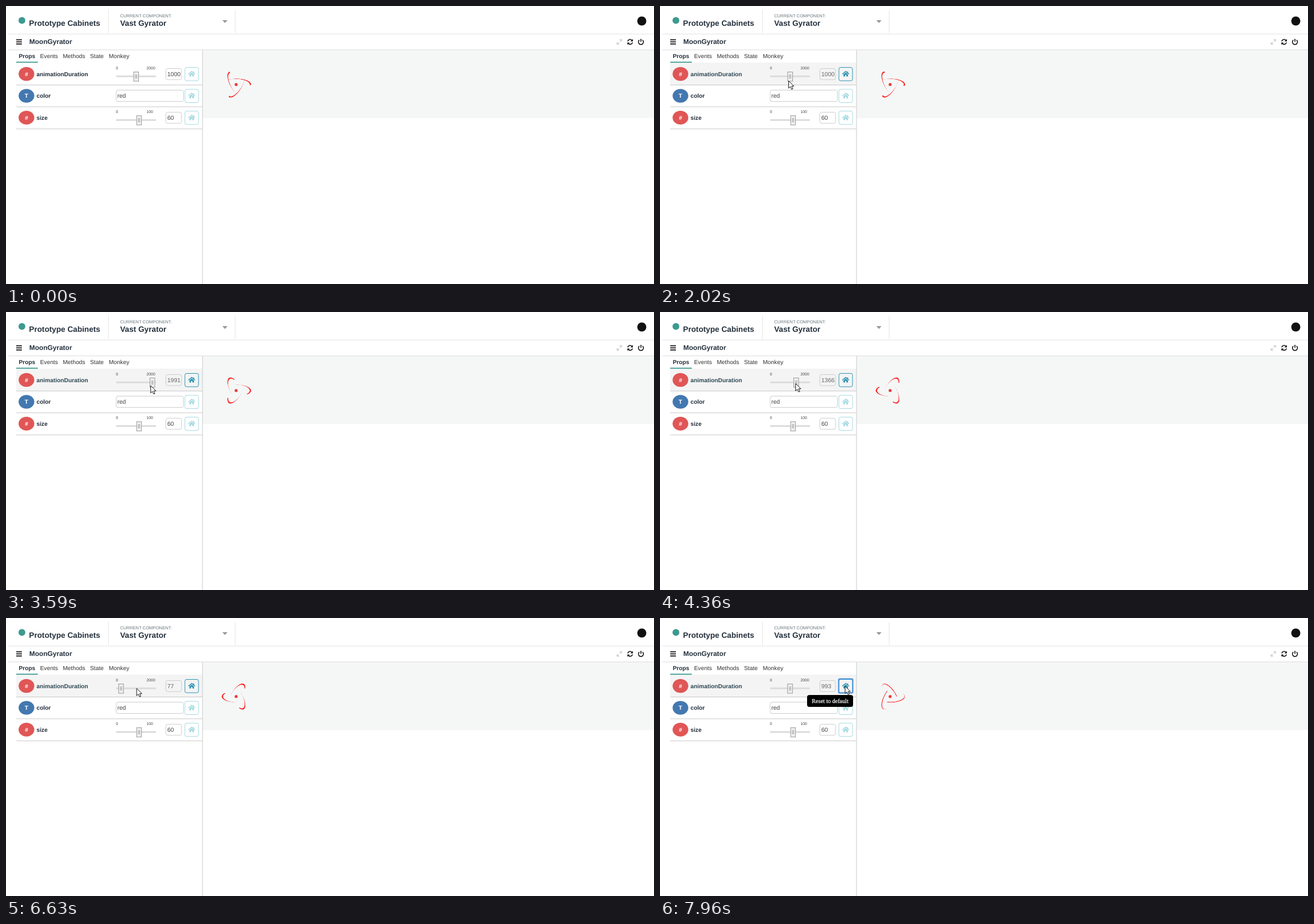
An HTML page for the animation above (8 s loop, 1141 by 491 pixels).

```html
<!DOCTYPE html>
<html lang="en">
<head>
<meta charset="utf-8">
<title>Component props panel</title>
<style>
  html, body { margin: 0; width: 100%; height: 100%; overflow: hidden; background: #fff; }
  svg { position: absolute; left: 0; top: 0; width: 1141px; height: 491px; }
  text { font-family: "Liberation Sans", Arial, sans-serif; font-size: 10.3px; fill: #333; text-rendering: geometricPrecision; white-space: pre; }
  .b { font-weight: 700; fill: #24303c; }
  .big { font-size: 13.7px; }
  .tiny { font-size: 6.9px; fill: #444; }
  .mark { font-weight: 700; fill: #fff; text-anchor: middle; }
  .field { font-size: 10.5px; fill: #444; }
  .back { fill: none; }
  .box { fill: #fff; stroke: #ccc; }
  .home { color: #a3d9e1; }
  .home rect { fill: #fff; stroke: currentColor; }
  .hover .home { color: #2b94b3; }
  .hover .back, .hover .box, .hover .home rect { fill: #f4f4f4; }
  .hover .b { fill: #2f4a55; }
  .hover .field { fill: #666; }
  #atom { position: absolute; left: 379.8px; top: 112.6px; width: 51.4px; height: 51.4px; }
  #atom div {
    position: absolute; box-sizing: border-box; width: 100%; height: 100%; border-radius: 50%;
    border-left: 2.06px solid #f00; border-top: 2.06px solid transparent;
  }
</style>
</head>
<body>
<svg viewBox="0 0 1141 491">
  <defs>
    <g id="house">
      <path d="M-4 .9L0 -2.4L4 .9V4.6H1.2V1.7H-1.2V4.6H-4ZM2.7 -4.4H4.2V-1H2.7Z" fill="currentColor"/>
      <path d="M-5.8 .4L0 -4.5L5.8 .4" fill="none" stroke="currentColor" stroke-width="1.5"/>
    </g>
    <g id="thumb">
      <rect x="-4.3" y="-8" width="8.6" height="16.4" fill="#efefef" stroke="#999"/>
      <path d="M-2 -2.5H2M-2 0H2M-2 2.5H2" stroke="#888"/>
    </g>
  </defs>

  <circle cx="28" cy="25.5" r="6" fill="#3c9a90"/>
  <text class="b big" x="40.5" y="35">Prototype Cabinets</text>
  <text x="201" y="19.6" style="font-size:7.7px;fill:#69767c">CURRENT COMPONENT:</text>
  <text class="b big" x="201" y="35">Vast Gyrator</text>
  <path d="M381 25H390L385.5 30Z" fill="#999"/>
  <path d="M180.5 6V48M403.5 8V48M4 49.5H1141" stroke="#e4e4e4"/>
  <circle cx="1119.5" cy="26.5" r="8" fill="#111"/>

  <path d="M18 59.7H28M18 63.4H28M18 67.1H28" stroke="#111" stroke-width="1.8"/>
  <text class="b" x="41" y="67.4" style="font-size:12px">MoonGyrator</text>
  <g fill="none" stroke="#111" stroke-width="1.6">
    <path d="M1076.5 67L1079.3 64.2M1080.8 62.6L1083.6 59.8M1076 64V67.5H1079.5M1080.5 59.3H1084V62.8" stroke="#ccc" stroke-width="1.3"/>
    <path d="M1094.7 62.4A4.3 4.3 0 0 1 1102 60.4M1103.2 64.4A4.3 4.3 0 0 1 1096 66.4"/>
    <path d="M1103.8 58.2V62.4H1099.6ZM1094.1 68.6V64.4H1098.3Z" fill="#111" stroke="none"/>
    <path d="M1115.3 60.2A4.4 4.4 0 1 0 1120.7 60.2M1118 58V63.3"/>
  </g>

  <rect x="346" y="78" width="795" height="120" fill="#f5f7f7"/>
  <path d="M4 77.5H1141" stroke="#ddd"/>
  <g id="rows"></g>
  <path d="M18 139.5H346M18 178H346M18 217H346M346 78V491" stroke="#c8c8c8"/>
  <g id="tabs"></g>
  <rect x="18" y="98.4" width="38" height="1.8" fill="#3c9a90"/>
</svg>

<div id="atom"><div></div><div></div><div></div></div>

<svg viewBox="0 0 1141 491">
  <circle cx="405.2" cy="138.7" r="2.6" fill="#ee3a3a"/>
  <rect id="focus" x="314.5" y="107.5" width="25" height="25" rx="2" fill="none" stroke="#4d93dc" stroke-width="2"/>
  <g id="tip">
    <rect x="259" y="136" width="81" height="21" rx="4" fill="#000"/>
    <text x="299.5" y="150.2" text-anchor="middle" style="font-family:'Liberation Serif',Times,serif;fill:#fff;stroke:#fff;stroke-width:.25">Reset to default</text>
  </g>
  <path id="cursor" d="M.5 .5V13.4L3.5 10.6L5.7 15.4L7.9 14.4L5.8 9.8H9.8Z" fill="#fff" stroke="#111"/>
</svg>

<script>
const $ = id => document.getElementById(id);
const LOOP = 8000, START = 70, STEP = 78.1;   // the picture advances in even steps
const GRAB = 2470, RELEASE = 7120, LAG = 130; // the thumb trails the dragging pointer

// ---- static panel ----
const tabs = { Props: 22.4, Events: 60, Methods: 100, State: 148, Monkey: 181 };
$('tabs').innerHTML = Object.entries(tabs).map(([name, x], i) =>
  `<text class="${i ? '' : 'b'}" x="${x}" y="91.8">${name}</text>`).join('');

const slider = (max, thumbX, value, id) => `
  <text class="tiny" x="193.6" y="-8.4">0</text>
  <text class="tiny" x="247.4" y="-8.4">${max}</text>
  <rect x="194" y="2.7" width="70" height="3" fill="#dcdcdc"/>
  <use id="${id}Thumb" href="#thumb" x="${thumbX}" y="4.5"/>
  <rect class="box" x="281.5" y="-9.5" width="27.5" height="19.5" rx="3"/>
  <text id="${id}Value" class="field" x="284" y="3.8">${value}</text>`;

const textBox = value => `
  <rect class="box" x="194" y="-10" width="118.5" height="20" rx="3"/>
  <text class="field" x="196" y="3.8">${value}</text>`;

const row = (name, i, mark, color, control) => `
  <g id="${name}" transform="translate(0 ${120 + 38.6 * i})">
    <rect class="back" x="18" y="-20" width="328" height="39"/>
    <ellipse cx="36" cy="0" rx="13.8" ry="12.2" fill="${color}"/>
    <text class="mark" x="36" y="3.7">${mark}</text>
    <text class="b" x="53.7" y="3.7">${name}</text>
    ${control}
    <g class="home">
      <rect x="315" y="-11.5" width="24" height="23.5" rx="3"/>
      <use href="#house" x="327"/>
    </g>
  </g>`;

$('rows').innerHTML =
  row('animationDuration', 0, '#', '#e05656', slider(2000, 229.2, 1000, 'dur')) +
  row('color', 1, 'T', '#4378b0', textBox('red')) +
  row('size', 2, '#', '#e05656', slider(100, 234.3, 60, 'size'));

// ---- motion ----
// Pointer stops: time, x, y. It eases from stop to stop.
const stops = [
  [START, 829, 480], [1000, 333, 339], [1700, 213, 160], [2150, 229.2, 125],
  [GRAB, 229.2, 126], [3020, 264, 132], [4340, 239.3, 126], [4580, 207, 122], [4850, 238, 122],
  [5680, 183, 122], [6110, 179, 166], [6310, 180, 128], [6820, 252, 122], [6980, 217, 122],
  [RELEASE, 229, 122], [7500, 325.5, 120]
];
// Turn of the rings in degrees; the pace follows the dragged duration.
const turns = [[0, 140], [2650, 1094], [2870, 1095], [4360, 1430], [5310, 1965], [6630, 3590], [7960, 4560]];

const clamp = (v, lo, hi) => Math.min(hi, Math.max(lo, v));
const linear = p => p;
const smooth = p => p * p * (3 - 2 * p);

function at(keys, t, ease) {
  const n = clamp(keys.findIndex(k => k[0] > t), -1, keys.length);
  if (n === 0) return keys[0].slice(1);
  if (n < 0) return keys[keys.length - 1].slice(1);
  const a = keys[n - 1], b = keys[n], p = ease((t - a[0]) / (b[0] - a[0]));
  return a.slice(1).map((v, i) => v + (b[i + 1] - v) * p);
}

const rings = [...$('atom').children];
const show = (id, on) => { $(id).style.display = on ? '' : 'none'; };

function draw(time) {
  const t = time < START ? 0 : START + STEP * Math.floor((time - START) / STEP + .35);
  const [x, y] = at(stops, t, smooth);
  const [thumbX] = at(stops, clamp(t - LAG, GRAB, RELEASE), smooth);
  const [angle] = at(turns, t, linear);

  $('cursor').setAttribute('transform', `translate(${x} ${y})`);
  show('cursor', time >= START);
  show('tip', t >= 7560);
  show('focus', t >= 7850);
  $('animationDuration').setAttribute('class', t >= 1950 ? 'hover' : '');
  $('durThumb').setAttribute('x', thumbX);
  $('durValue').textContent = clamp(Math.round(1000 + (thumbX - 229.2) / .0288), 0, 2000);
  rings.forEach((ring, i) => {
    ring.style.transform = `rotateZ(${120 * (i + 1)}deg) rotateX(66deg) rotateZ(${angle % 360}deg)`;
  });
}

const begin = performance.now();
function tick() {
  draw((performance.now() - begin) % LOOP);
  requestAnimationFrame(tick);
}
tick();
</script>
</body>
</html>
```
